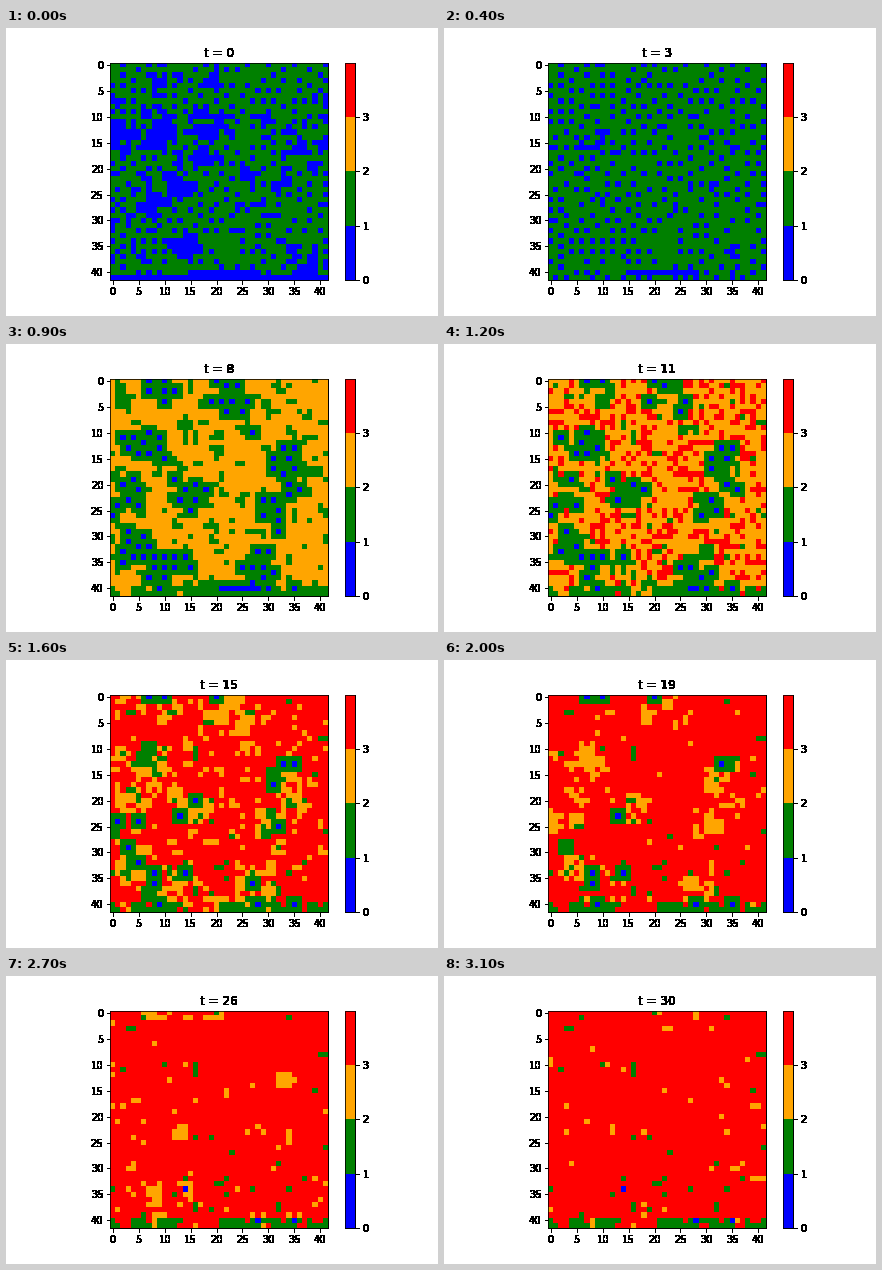
A matplotlib script for the animation above (3.3 s loop, 432x288 px).

```python
import numpy as np
import matplotlib.pyplot as plt
from matplotlib.animation import FuncAnimation
from matplotlib.colors import ListedColormap

N = 42
STEPS = 30
NEVER = 99
rng = np.random.default_rng(11)
rows, cols = np.mgrid[:N, :N]


def spread_max(a):
    """Largest value in the 3x3 neighbourhood."""
    p = np.pad(a, 1)
    return np.max([p[i:i + N, j:j + N] for i in range(3) for j in range(3)], axis=0)


def patchy(size=2):
    """Noise whose values are shared by nearby cells."""
    a = rng.random((N, N))
    return sum(np.roll(a, (i, j), (0, 1)) for i in range(size) for j in range(size)) / size


def rank(a):
    """Replace values by their order, spread evenly over 0..1."""
    return a.ravel().argsort().argsort().reshape(a.shape) / a.size


def bumps(centres, width=3.5):
    """Soft hills around the given (row, col) points."""
    return np.max([np.exp(-((rows - r) ** 2 + (cols - c) ** 2) / (2 * width ** 2))
                   for r, c in centres], axis=0)


def patchy_wait(p):
    """Geometric waiting times that come in small clumps."""
    u = 1 - rank(patchy())
    return np.maximum(np.ceil(np.log(u) / np.log(1 - p)), 1).astype(int)


def scatter_dots():
    """Fill the grid with single cells that never touch each other."""
    taken = np.zeros((N + 2, N + 2), bool)
    for k in rng.permutation(N * N):
        r, c = divmod(int(k), N)
        if not taken[r:r + 3, c:c + 3].any():
            taken[r + 1, c + 1] = True
    return taken[1:-1, 1:-1] & (rng.random((N, N)) < 0.88)


def plan():
    """Step at which every cell turns green, orange and red."""
    open_hills = bumps([(23, 12), (13, 9), (14, 2), (39, 38), (18, 16),
                        (12, 19), (34, 14), (17, 37), (27, 8)], 2)
    is_open = rank(0.9 * open_hills + patchy()) > 0.8
    is_open[-1] = True
    slow_hills = bumps([(21, 15), (22, 3), (12, 6), (4, 23), (32, 4), (36, 28),
                        (36, 11), (24, 31), (1, 10), (17, 34)])
    slow = rank(slow_hills + 0.4 * patchy(3)) > 0.72

    # Blue: open areas fill first, lone dots later, slow dots last
    green = np.where(is_open, patchy_wait(0.55), 0)
    fast_turn = rng.integers(4, 7, (N, N))
    slow_turn = 8 + rng.geometric(0.2, (N, N))
    green = np.where(scatter_dots(), np.where(slow, slow_turn, fast_turn), green)
    green[40, 15:29] = np.linspace(6, 13, 14)
    green[40, [28, 35]] = NEVER

    # Green waits for the blue dots next to it
    orange = spread_max(np.minimum(green, 22)) + patchy_wait(0.5)
    stuck = rank(patchy()) > 0.98
    stuck[40:] = rank(patchy())[40:] > 0.5
    orange = np.where(stuck, NEVER, np.maximum(orange, 5))
    orange = np.maximum(orange, green)

    wait = np.ceil(4.5 * rng.weibull(2, (N, N))).astype(int)
    red = np.maximum(orange, 8) + wait
    return green, orange, red


turns = plan()
relapse = np.where(rank(patchy()) > 0.94, rng.integers(18, STEPS, (N, N)), NEVER)


def grid(t):
    state = sum((t >= turn).astype(int) for turn in turns)
    fallen = (t >= relapse) & (t < relapse + 5)
    return np.where(fallen, np.minimum(state, 2), state)


def harden(img, dpi):
    """Make every touched pixel solid."""
    img[..., 3] = img[..., 3] > 0
    return img, 0, 0


fig = plt.figure(figsize=(6, 4), dpi=72, facecolor="white")
fig.subplots_adjust(left=0.125, right=0.9, bottom=0.125, top=0.88)
ax = fig.add_subplot()
cmap = ListedColormap(["blue", "green", "orange", "red"])
image = ax.imshow(grid(0), cmap=cmap, vmin=0, vmax=4, interpolation="nearest")
ax.set_xticks(range(0, N, 5))
ax.set_yticks(range(0, N, 5))
title = ax.set_title("t = 0")
bar = fig.colorbar(image, ax=ax, ticks=range(4))

for panel in (ax, bar.ax):
    panel.set_agg_filter(harden)


def draw(i):
    t = min(max(i - 1, 0), STEPS)
    image.set_data(grid(t))
    title.set_text(f"t = {t}")
    return image, title


anim = FuncAnimation(fig, draw, frames=STEPS + 3, interval=100,
                     repeat=True, repeat_delay=0, blit=False)
plt.show()
```
